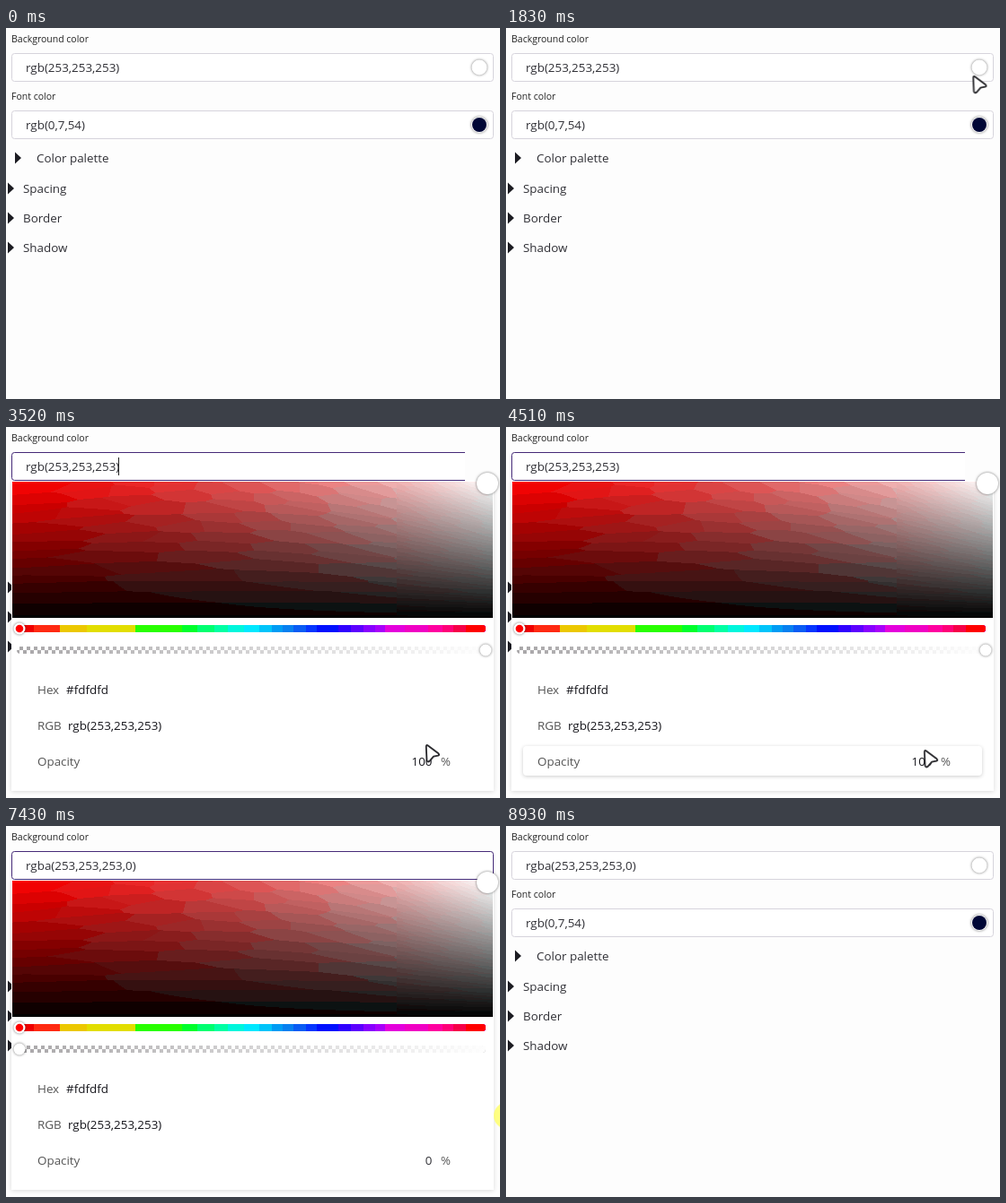
These frames come from a looping animation (550 px wide and 414 px high, 9.56 s). An HTML page with a canvas:

```html
<!DOCTYPE html>
<html lang="en">
<head>
<meta charset="utf-8">
<title>Background color picker</title>
<style>
  html, body { margin: 0; width: 100%; height: 100%; overflow: hidden; background: #fdfdfd; }
  .stage { position: absolute; left: 0; top: 0; width: 550px; height: 414px; overflow: hidden; }
  .stage > *, .picker > * { position: absolute; left: 0; top: 0; }
  .picker { width: 550px; height: 414px; }
  .panel { left: 6px; top: 60px; width: 537px; height: 346px; background: #fff; box-shadow: 0 1px 5px rgba(0, 0, 0, .14); }
  .picker canvas { left: 7px; top: 61px; }
  .row { left: 19px; top: 356px; width: 511px; height: 33px; border-radius: 4px; background: #fff; box-shadow: 0 1px 4px rgba(0, 0, 0, .2); }
  text { font: 13.4px "Open Sans", "Noto Sans", sans-serif; fill: #303036; white-space: pre; }
  .label { font-size: 10.5px; fill: #222; }
  .name { fill: #555; }
  .value { fill: #16161c; }
  .knob { fill: #fff; filter: drop-shadow(0 0 1.5px rgba(0, 0, 0, .55)); }
  .box { fill: #fff; stroke: #d6d4dc; }
  .focus { fill: none; stroke: #452a78; }
</style>
</head>
<body>
<div class="stage">
  <svg width="550" height="414">
    <text class="label" x="6" y="16">Background color</text>
    <rect class="box" x="6.5" y="28.5" width="536" height="31" rx="3"/>
    <circle class="knob" cx="527" cy="44" r="8.5"/>
    <text class="label" x="6" y="80">Font color</text>
    <rect class="box" x="6.5" y="92.5" width="536" height="31" rx="3"/>
    <circle class="knob" cx="527" cy="108" r="9"/>
    <circle cx="527" cy="108" r="8" fill="#000736"/>
    <text x="22" y="113">rgb(0,7,54)</text>
    <g fill="#1c1c22">
      <path d="M10 138.500l7 6.500-7 6.500z"/>
      <path d="M2 172.500l7 6.500-7 6.500z"/>
      <path d="M2 205.500l7 6.500-7 6.500z"/>
      <path d="M2 238.500l7 6.500-7 6.500z"/>
    </g>
    <text x="34" y="150">Color palette</text>
    <text x="19" y="184">Spacing</text>
    <text x="19" y="217">Border</text>
    <text x="19" y="250">Shadow</text>
  </svg>

  <div class="picker" id="picker">
    <div class="panel"></div>
    <canvas id="shades" width="535" height="152"></canvas>
    <div class="row" id="row"></div>
    <svg width="550" height="414">
      <defs>
        <clipPath id="pill"><rect x="11" y="221" width="523" height="8" rx="4"/></clipPath>
        <pattern id="checks" x="15" y="245" width="8" height="8" patternUnits="userSpaceOnUse">
          <path d="M0 0h4v8h4v-4h-8z" fill="#a9a7a9"/>
        </pattern>
        <linearGradient id="fade">
          <stop offset="0" stop-color="#fdfdfd" stop-opacity="0"/>
          <stop offset="1" stop-color="#fdfdfd"/>
        </linearGradient>
      </defs>
      <rect x="7" y="29" width="535" height="31" fill="#fff"/>
      <g id="hues" clip-path="url(#pill)"></g>
      <circle class="knob" cx="15" cy="225" r="6.500"/>
      <circle cx="15" cy="225" r="4.300" fill="#f00"/>
      <rect x="12" y="245" width="522" height="8" rx="4" fill="url(#checks)"/>
      <rect x="12" y="245" width="522" height="8" rx="4" fill="url(#fade)"/>
      <text class="name" x="35" y="298">Hex</text>
      <text class="value" x="67" y="298">#fdfdfd</text>
      <text class="name" x="35" y="338">RGB</text>
      <text class="value" x="69" y="338">rgb(253,253,253)</text>
      <text class="name" x="35" y="378">Opacity</text>
      <text class="name" x="484" y="378">%</text>
      <g id="opaque">
        <circle class="knob" cx="534" cy="249" r="6.500"/>
        <text class="value" x="474.500" y="378" text-anchor="end">100</text>
      </g>
      <g id="clear">
        <circle class="knob" cx="15" cy="249" r="6.500"/>
        <text x="474.500" y="378" text-anchor="end">0</text>
      </g>
    </svg>
  </div>

  <svg width="550" height="414">
    <rect id="focus" class="focus" x="6.500" y="28.500" width="536" height="31" rx="3"/>
    <rect id="gap" x="511" y="28" width="33" height="32" fill="#fdfdfd"/>
    <text id="solidText" x="22" y="49">rgb(253,253,253)</text>
    <text id="clearText" x="22" y="49">rgba(253,253,253,0)</text>
    <path id="caret" d="M125.500 34v20" stroke="#222"/>
    <circle id="handle" class="knob" cx="536" cy="63" r="12"/>
    <g id="cursor">
      <circle id="halo" cx="1" cy="2" r="15" fill="#ffff5a" fill-opacity=".75"/>
      <path d="M2.500 1.200L14.500 10.300Q16 12 14 12.700L9 13.700 4.500 18.800Q2.400 20.500 1.500 18L.8 3Q.8 .2 2.500 1.200z"
            fill="#fff" stroke="#26262a" stroke-width="1.800" stroke-linejoin="round"/>
    </g>
  </svg>
</div>

<script>
const LOOP = 9560;
const $ = id => document.getElementById(id);
const play = (el, frames) => el.animate(frames, { duration: LOOP, iterations: Infinity });

// Show an element only during the given [start, end] spans.
function show(id, ...spans) {
  const frame = (time, opacity) => ({ offset: time / LOOP, opacity, easing: 'step-end' });
  const frames = spans.flatMap(([start, end]) => [frame(start, 1), frame(end, 0)]);
  if (spans[0][0] > 0) frames.unshift(frame(0, 0));
  if (spans.at(-1)[1] < LOOP) frames.push(frame(LOOP, 0));
  play($(id), frames);
}

function move(id, path) {
  play($(id), path.map(([time, x, y]) => ({ offset: time / LOOP, transform: `translate(${x}px, ${y}px)` })));
}

// Red shades, each snapped to the nearest entry of a loose palette.
function paintShades(canvas) {
  const { width, height } = canvas;
  const ctx = canvas.getContext('2d');
  const image = ctx.createImageData(width, height);
  const noise = (i, j) => {
    const n = Math.sin(i * 127.1 + j * 311.7) * 43758.5453;
    return n - Math.floor(n) - .5;
  };
  const snap = (r, g, step) => {
    const ci = Math.round(r / step), cj = Math.round(g / step);
    let best = Infinity, hit;
    for (let i = ci - 1; i <= ci + 1; i++) {
      for (let j = cj - 1; j <= cj + 1; j++) {
        const pr = (i + noise(i, j) * .7) * step, pg = (j + noise(j + 40, i) * .7) * step;
        const d = (pr - r) ** 2 + (pg - g) ** 2;
        if (d < best) { best = d; hit = [pr, pg]; }
      }
    }
    return hit;
  };
  for (let y = 0; y < height; y++) {
    for (let x = 0; x < width; x++) {
      const u = x / (width - 1), v = 1 - y / (height - 1);
      const red = 255 * v * (1 - .1 * Math.sin(Math.PI * u));
      const [r, g] = snap(red, red * u ** 1.35, u > .8 ? 7 : 17);
      image.data.set([r, g, g, 255], (y * width + x) * 4);
    }
  }
  ctx.putImageData(image, 0, 0);
}

const hues = [
  [11, '#f00000'], [31, '#ff2a12'], [60, '#ecc800'], [90, '#e2de00'], [144, '#28ff00'],
  [196, '#00ff2c'], [213, '#00ff70'], [232, '#00ffa4'], [247, '#00f6dc'], [265, '#00e8ff'],
  [282, '#00c4fa'], [296, '#009cf4'], [308, '#0880f0'], [320, '#0a5cf4'], [334, '#0636ff'],
  [346, '#0010ff'], [370, '#3000ff'], [384, '#5c00ff'], [398, '#8800ff'], [411, '#a800fa'],
  [422, '#e400dc'], [444, '#f000c4'], [470, '#ff00a0'], [486, '#ff0078'], [498, '#f60048'], [512, '#ff0000']
];
$('hues').innerHTML = hues.map(([x, color]) =>
  `<rect x="${x}" y="221" width="${534 - x}" height="8" fill="${color}"/>`).join('');
paintShades($('shades'));

const opened = 2360, typed = 4970, closed = 7550;
show('picker', [opened, closed]);
show('handle', [opened, closed]);
show('focus', [1890, 7610]);
show('gap', [2830, typed]);
show('caret', [opened, 2890], [3420, 3860]);
show('row', [3670, 6040]);
show('opaque', [0, typed]);
show('clear', [typed, LOOP]);
show('solidText', [0, typed]);
show('clearText', [typed, LOOP]);
show('halo', [2200, opened], [3860, 4000], [7430, closed]);
show('cursor', [1050, closed], [8750, 8930]);
move('cursor', [
  [0, 455, 385], [1050, 455, 385], [1200, 475, 300], [1290, 490, 240], [1350, 499, 185],
  [1440, 506, 127], [1620, 514, 85], [1800, 519, 55], [1950, 521, 45], [2830, 521, 45],
  [3000, 512, 120], [3200, 492, 240], [3380, 474, 325], [3520, 467, 354], [3670, 465, 360],
  [4510, 465, 360], [4600, 474, 361], [5460, 474, 361], [5580, 532, 337], [5920, 532, 337],
  [6040, 532, 336], [6290, 533, 336], [6750, 546, 329], [6900, 547, 328], [7210, 549, 328],
  [7400, 557, 321], [8690, 557, 330], [8750, 544, 355], [8810, 536, 371], [8930, 531, 414], [LOOP, 531, 414]
]);
</script>
</body>
</html>
```
